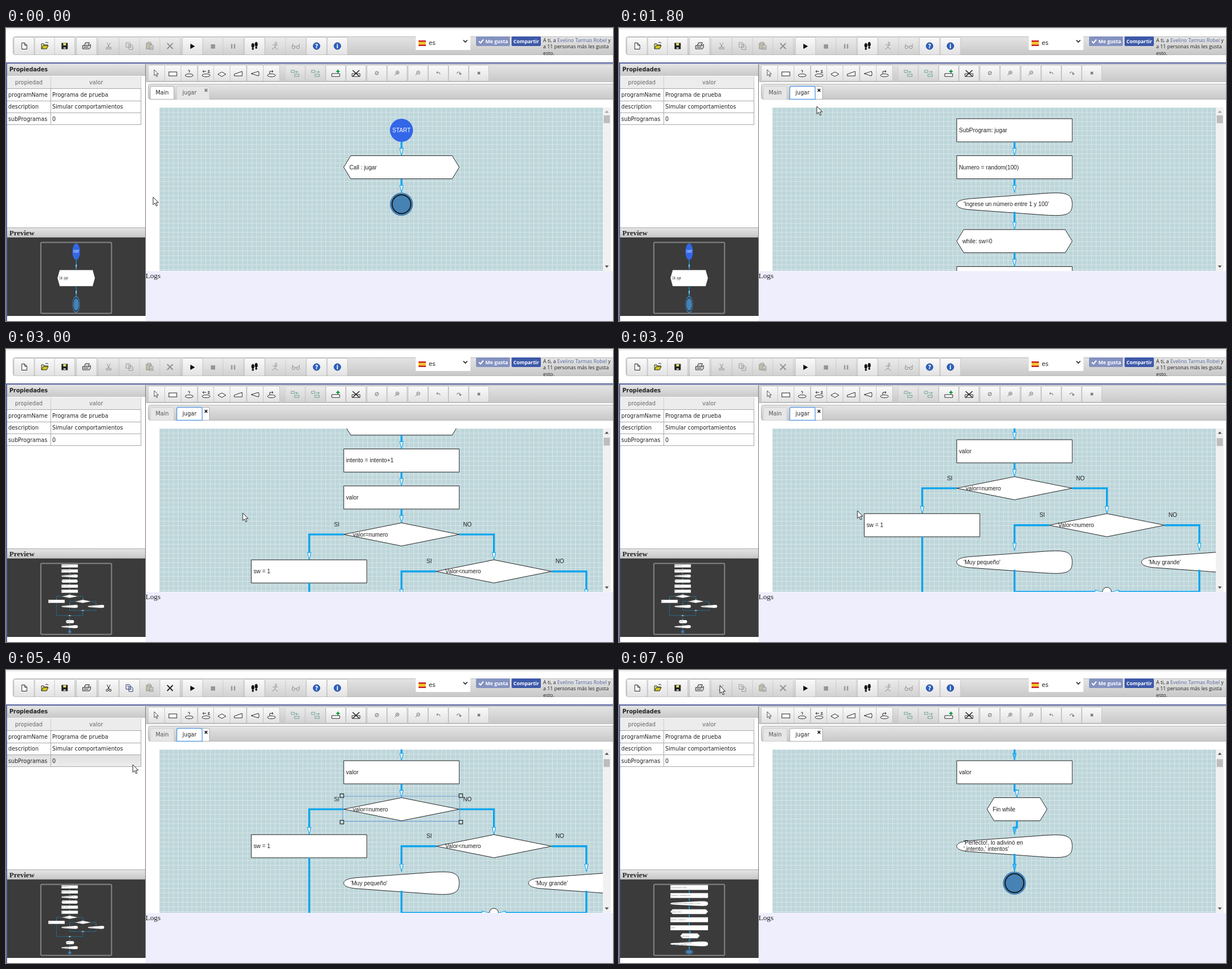
Animation, 1077 px wide and 520 px high, one loop 8 s. Source, as an HTML page:

```html
<!DOCTYPE html>
<html lang="es">
<head>
<meta charset="utf-8">
<title>Editor de diagramas</title>
<style>
html, body { margin: 0; width: 100%; height: 100%; overflow: hidden; background: #fff; }
svg { display: block; width: 1077px; height: 520px; }
text { fill: #222; stroke: none; white-space: pre; }
.ui { font-family: "DejaVu Sans", sans-serif; font-size: 9.7px; }
.small { font-family: "Open Sans", sans-serif; font-size: 8.9px; }
.serif { font-family: "Liberation Serif", serif; font-size: 13.4px; }
.node { font-family: "Liberation Sans", sans-serif; font-size: 10.2px; }
.b { font-weight: bold; }
.shape { fill: #fff; stroke: #222; stroke-width: 1; }
.link { fill: none; stroke: #0aa4ee; stroke-width: 3.4; }
.head { fill: #fff; stroke: #0aa4ee; stroke-width: 1.1; }
#cut .head { fill: #4cbdf2; }
#cut .open .head { fill: #fff; }

.t { animation: 8s step-end infinite; }
.main { animation-name: main; }
.flow { animation-name: flow; }
.cut { animation-name: cut; }
.pmain { animation-name: pmain; }
.pflow { animation-name: pflow; }
.pcut { animation-name: pcut; }
.scroll { animation-name: scroll; }
.thumb { animation-name: thumb; }
.up { animation-name: up; }
.tabHover { animation-name: tabHover; }
.tabOn { animation-name: tabOn; }
.picked { animation-name: picked; }
.cutHover { animation-name: cutHover; }
.tip { animation-name: tip; }
.rowHover { animation-name: rowHover; }
.pointer { animation-name: pointer; }
.arrow { animation-name: arrow; }
.hand { animation-name: hand; }

@keyframes main { 0% { visibility: visible } 17.5%, 100% { visibility: hidden } }
@keyframes flow { 0% { visibility: hidden } 17.5% { visibility: visible } 87.5%, 100% { visibility: hidden } }
@keyframes cut { 0% { visibility: hidden } 87.5%, 100% { visibility: visible } }
@keyframes pmain { 0% { visibility: visible } 25%, 100% { visibility: hidden } }
@keyframes pflow { 0% { visibility: hidden } 25% { visibility: visible } 95%, 100% { visibility: hidden } }
@keyframes pcut { 0% { visibility: hidden } 95%, 100% { visibility: visible } }
@keyframes tabHover { 0% { visibility: hidden } 15% { visibility: visible } 17.5%, 100% { visibility: hidden } }
@keyframes tabOn { 0% { visibility: hidden } 17.5%, 100% { visibility: visible } }
@keyframes picked { 0% { visibility: hidden } 52.5% { visibility: visible } 87.5%, 100% { visibility: hidden } }
@keyframes cutHover { 0% { visibility: hidden } 75% { visibility: visible } 87.5%, 100% { visibility: hidden } }
@keyframes tip { 0% { opacity: 0 } 82.5% { opacity: .4 } 85% { opacity: 1 } 87.5% { opacity: .4 } 90%, 100% { opacity: 0 } }
@keyframes up { 0% { fill: #a3a3a3 } 32.5%, 100% { fill: #505050 } }
@keyframes scroll {
  0% { transform: translateY(0) }
  32.5% { transform: translateY(-82px) }
  35% { transform: translateY(-164px) }
  37.5% { transform: translateY(-246px) }
  40%, 100% { transform: translateY(-328px) }
}
@keyframes thumb {
  0% { transform: translateY(0) }
  32.5% { transform: translateY(.8px) }
  35% { transform: translateY(1.6px) }
  37.5% { transform: translateY(2.4px) }
  40%, 100% { transform: translateY(3.2px) }
}
@keyframes rowHover {
  0% { visibility: hidden; transform: translateY(0) }
  67.5% { visibility: visible; transform: translateY(43px) }
  70% { visibility: visible; transform: translateY(0) }
  72.5%, 100% { visibility: hidden; transform: translateY(0) }
}
@keyframes arrow {
  0% { visibility: visible } 15% { visibility: hidden } 22.5% { visibility: visible }
  75% { visibility: hidden } 87.5%, 100% { visibility: visible }
}
@keyframes hand {
  0% { visibility: hidden } 15% { visibility: visible } 22.5% { visibility: hidden }
  75% { visibility: visible } 87.5%, 100% { visibility: hidden }
}
@keyframes pointer {
  0% { transform: translate(261px, 300px) }
  2.5% { transform: translate(243px, 297px) }
  5% { transform: translate(217px, 275px) }
  7.5% { transform: translate(211px, 238px) }
  10% { transform: translate(243px, 186px) }
  12.5% { transform: translate(303px, 142px) }
  15% { transform: translate(333px, 113px) }
  20% { transform: translate(342px, 121px) }
  22.5% { transform: translate(351px, 139px) }
  25% { transform: translate(362px, 148px) }
  30% { transform: translate(385px, 230px) }
  32.5% { transform: translate(415px, 297px) }
  35% { transform: translate(417px, 295px) }
  37.5% { transform: translate(420px, 291px) }
  40% { transform: translate(423px, 287px) }
  42.5% { transform: translate(425px, 281px) }
  45% { transform: translate(480px, 270px) }
  47.5% { transform: translate(590px, 255px) }
  50% { transform: translate(660px, 245px) }
  55% { transform: translate(808px, 260px) }
  57.5% { transform: translate(795px, 263px) }
  60% { transform: translate(700px, 255px) }
  62.5% { transform: translate(520px, 232px) }
  65% { transform: translate(350px, 200px) }
  67.5% { transform: translate(225px, 168px) }
  70% { transform: translate(214px, 115px) }
  72.5% { transform: translate(202px, 58px) }
  75% { transform: translate(186px, 38px) }
  77.5% { transform: translate(177px, 28px) }
  87.5%, 100% { transform: translate(179px, 28px) }
}
</style>
</head>
<body>
<svg id="stage" viewBox="0 0 1077 520"></svg>
<script>
const rect = (x, y, w, h, fill, more = '') =>
  `<rect x="${x}" y="${y}" width="${w}" height="${h}" fill="${fill}" ${more}/>`;
const text = (x, y, s, cls, more = '') => `<text x="${x}" y="${y}" class="${cls}" ${more}>${s}</text>`;
const path = (d, more = '') => `<path d="${d}" ${more}/>`;
const circle = (x, y, r, more = '') => `<circle cx="${x}" cy="${y}" r="${r}" ${more}/>`;
const timed = (name, body) => `<g class="t ${name}">${body}</g>`;
const at = (x, y, body, more = '') => `<g transform="translate(${x} ${y})" ${more}>${body}</g>`;

// Flowchart parts
const CX = 701.7, W = 205, H = 41, LEFT = 599.2;
const row = k => 161 + 65.6 * k;
const shape = d => path(d, 'class="shape"');
const label = (x, k, s) => text(x, row(k) + 24, s, 'node');
const box = (x, k, s) => shape(`M${x} ${row(k)}h${W}v${H}h${-W}z`) + label(x + 4, k, s);
const hex = (x, k, s, w = W) =>
  shape(`M${x} ${row(k) + 20.5}l12.5 -20.5h${w - 25}l12.5 20.5l-12.5 20.5h${25 - w}z`) + label(x + 10, k, s);
const diamond = (x, k, s) =>
  shape(`M${x} ${row(k) + 20.5}l102.5 -20.5l102.5 20.5l-102.5 20.5z`) + label(x + 16, k, s);
const display = (x, k, lines) => {
  const y = row(k) + 20.5;
  const body = shape(`M${x} ${y}c0 -5 8 -9 27 -10l130 -9.3c34 -2 48 -1 48 19.3s-14 21.3 -48 19.3l-130 -9.3c-19 -1 -27 -5 -27 -10z`);
  return body + (lines.length === 1 ? label(x + 12, k, lines[0])
    : lines.map((s, i) => text(x + 12, y - 3 + 11.5 * i, s, 'node')).join(''));
};
const link = (d, x, y, turn = 0) => path(d, 'class="link"') +
  path('M-3 -13h6l-3 13z', `class="head" transform="translate(${x} ${y}) rotate(${turn})"`);
const down = (x, y1, y2) => link(`M${x} ${y1}V${y2 - 12}`, x, y2);
const next = (k, from = H) => down(CX, row(k) + from, row(k + 1));
const end = k => circle(CX, row(k) + 20.5, 20.5, 'fill="#4682b4"') +
  circle(CX, row(k) + 20.5, 16.6, 'fill="none" stroke="#111" stroke-width="1.7"');
const join = (x, y) => circle(x, y, 8, 'class="shape"');

const mainChart = next(0) + next(1) +
  circle(CX, row(0) + 20.5, 20.5, 'fill="#3367e8"') +
  text(CX, row(0) + 24, 'START', 'node', 'text-anchor="middle" style="fill:#fff"') +
  hex(LEFT, 1, 'Call : jugar') + end(2);

const head = [
  box(LEFT, 0, 'SubProgram: jugar'), box(LEFT, 1, 'Numero = random(100)'),
  display(LEFT, 2, ["'Ingrese un número entre 1 y 100'"]), hex(LEFT, 3, 'while: sw=0'),
  box(LEFT, 4, 'intento = intento+1'), box(LEFT, 5, 'valor')
].join('') + [0, 1, 2, 3, 4].map(k => next(k, k === 2 ? 34 : H)).join('');

const X1 = 538, X2 = 865.7, X3 = 1029.7, J1 = row(9) + 7.6, J2 = row(10) + 7.6;
const mid = k => row(k) + 20.5;
const perfect = ["'Perfecto!, lo adivinó en", "',intento,' intentos'"];
const flowChart = head + next(5) +
  diamond(LEFT, 6, 'valor=numero') + text(582, row(6) + 6, 'SI', 'node') + text(811, row(6) + 6, 'NO', 'node') +
  link(`M${LEFT} ${mid(6)}H${X1}V${row(7) - 12}`, X1, row(7)) +
  link(`M${LEFT + W} ${mid(6)}H${X2}V${row(7) - 12}`, X2, row(7)) +
  box(435.2, 7, 'sw = 1') + diamond(763.2, 7, 'Valor&lt;numero') +
  text(746, row(7) + 6, 'SI', 'node') + text(975, row(7) + 6, 'NO', 'node') +
  link(`M763.2 ${mid(7)}H${CX}V${row(8) - 12}`, CX, row(8)) +
  link(`M968.2 ${mid(7)}H${X3}V${row(8) - 12}`, X3, row(8)) +
  display(LEFT, 8, ["'Muy pequeño'"]) + display(927.2, 8, ["'Muy grande'"]) +
  link(`M${CX} ${row(8) + 34}V${J1}H846`, X2 - 8, J1, -90) +
  link(`M${X3} ${row(8) + 34}V${J1}H886`, X2 + 8, J1, 90) + join(X2, J1) +
  link(`M${X1} ${row(7) + H}V${J2}H682`, CX - 8, J2, -90) +
  link(`M${X2} ${J1 + 8}V${J2}H722`, CX + 8, J2, 90) + join(CX, J2) +
  down(CX, J2 + 8, row(11)) + hex(653, 11, 'Fin while', 106.5) + next(11) +
  display(LEFT, 12, perfect) + next(12, 34) + end(13);

const FX = 706;
const cutChart = head + hex(653, 6, 'Fin while', 106.5) + display(LEFT, 7, perfect) + end(8) +
  `<g class="open">${link(`M${CX} ${row(5) + H}v12H${FX}v3`, FX, row(6))}</g>` +
  link(`M${FX} ${row(6) + H}v12H${CX}v3`, CX, row(7)) + next(7, 34);

const handles = [[596, 223], [807, 223], [596, 270], [807, 270]]
  .map(([x, y]) => rect(x - 3.2, y - 3.2, 6.4, 6.4, '#c4dde2', 'stroke="#222" stroke-width="1.2"')).join('');
const selection = rect(597.5, 224, 207.5, 44.5, 'none', 'stroke="#6a98d8"') + handles;

// Toolbar
const button = (x, y, w, h, more = '') =>
  rect(x - w / 2, y - h / 2, w, h, 'url(#btn)', `stroke="#c6c6c6" rx="2" ${more}`);
const badge = s => circle(0, 0, 6, 'fill="#2d62c4" stroke="#183c86"') +
  text(0, 3.5, s, 'ui b', 'text-anchor="middle" style="fill:#fff"');
const icons = {
  doc: path('M-4 -5.5h5l4 4v7h-9zM1 -5.5v4h4', 'fill="#fff"'),
  open: path('M-6 5v-9h4l1 2h6v2', 'fill="#f4eb95"') + path('M-6 5l3 -6h9l-3 6z', 'fill="#d9c81c"') + path('M1 -6q3 -2 5 1'),
  save: rect(-5, -5, 10, 10, '#222') + rect(-2.5, -5, 5, 4, '#e5df62', 'stroke="none"') + rect(-2, 2, 4, 3, '#aaa', 'stroke="none"'),
  print: path('M-4 -1l2 -5h7l-2 5M-7 -1h12l2 -2v5l-2 3h-12zM-5 2h8', 'fill="#ddd"'),
  cut: path('M-3 -6l4.5 8.5M3 -6l-4.5 8.5') + circle(-2.5, 4, 1.9) + circle(2.8, 4, 1.9),
  copy: path('M-6 -6h6l2 2v6h-8zM-1 -2h5l2 2v6h-7zM-4 -3h4M1 2h3', 'fill="#fff"'),
  paste: rect(-6, -5, 9, 10, '#aa9a55') + rect(-3, -7, 4, 3, '#eee') + rect(0, -1, 6, 7, '#fff') + path('M1 2h4M1 4h4'),
  del: path('M-5 -5l10 10M5 -5l-10 10', 'stroke-width="1.8"'),
  play: path('M-3.5 -3.5l7 4l-7 4z', 'fill="#000"'),
  stop: rect(-3, -2.5, 6.5, 6.5, '#333'),
  pause: path('M-2.5 -3.5v8M2.5 -3.5v8', 'stroke-width="2.2"'),
  steps: '<ellipse cx="-3" cy="-1" rx="2.2" ry="4"/><ellipse cx="3" cy="-3" rx="2.2" ry="4"/><circle cx="-3" cy="5" r="1.4"/><circle cx="3" cy="3" r="1.4"/>',
  run: circle(1, -5.5, 1.5) + path('M-5 -2h9M1 -3l-2 5l5 4M-1 2l-5 4'),
  glasses: circle(-4, 2, 2.6) + circle(4, 2, 2.6) + path('M-1.5 1h3M-6 0l1 -4M6 0l1 -4'),
  help: badge('?'),
  info: badge('i')
};
const tool = (x, name, on) => at(x, 32,
  button(0, 0, 36, 31) + `<g fill="${name === 'steps' ? '#111' : 'none'}" stroke="${name === 'copy' && on ? '#1c2b66' : '#222'}">${icons[name]}</g>`,
  on ? '' : 'opacity=".38"');
const tools = [[32, 'doc', 1], [69, 'open', 1], [104, 'save', 1], [143, 'print', 1], [182, 'cut'], [219, 'copy'],
  [255, 'paste'], [291, 'del'], [331, 'play', 1], [367, 'stop'], [403, 'pause'], [441, 'steps', 1], [478, 'run'],
  [514, 'glasses'], [551, 'help', 1], [588, 'info', 1]].map(a => tool(...a)).join('');
const enabledTools = ['cut', 'copy', 'del'].map((n, i) => tool([182, 219, 291][i], n, 1)).join('');

const ARROW = 'M0 0V13.5l3.1 -2.8l2.3 5.2l2.2 -1l-2.3 -5h4.4z';
const plate = 'M-7 6h14v-5h-14z';
const glass = s => circle(0.5, -1, 2.8) + path('M-1.5 1l-3 3M-.8 -1h2.6' + s);
const parts = [
  [267, 29, path(ARROW, 'fill="#fff" transform="translate(-4 -6) scale(.78)"'), 1],
  [296, 29, rect(-7, -2, 14, 7, '#fff'), 1],
  [325, 29, '<ellipse cy="4" rx="7" ry="2.5" fill="#fff"/>' + path('M-2 -4q2 -3 3 0l-1 3'), 1],
  [355, 29, '<ellipse cy="4" rx="7" ry="2.5" fill="#fff"/>' + path('M-6 -3h6m-4 -2l-2 2l2 2M3 -4q3 -2 3 0l-3 3h4'), 1],
  [383, 29, path('M-7 2l7 -4l7 4l-7 4z', 'fill="#fff"'), 1],
  [412, 29, path('M-7 5v-3l14 -5v8z', 'fill="#fff"'), 1],
  [442, 29, path('M-7 1l13 -4q2 4 0 8z', 'fill="#fff"'), 1],
  [471, 29, '<ellipse cy="4" rx="7" ry="2.5" fill="#fff"/>' + path('M-3 1v-4h6m-2 -2l2 2l-2 2'), 1],
  [513, 35, path('M-7 -5h6v4h-6zM-1 2h8v4h-8zM6 -2h-5m2 -2l-2 2l2 2', 'stroke="#277a68"')],
  [549, 35, path('M-7 -5h6v4h-6zM-1 2h8v4h-8zM1 -2h6m-2 -2l2 2l-2 2', 'stroke="#277a68"')],
  [585, 35, path(plate, 'fill="#fff"') + path('M4 -6v6M1 -3h6', 'stroke="#079a37" stroke-width="2"'), 1],
  [621, 35, path(plate, 'fill="#fff"') + path('M-6 -5l12 11M6 -5l-12 11', 'stroke-width="1.6"'), 1],
  [658, 35, circle(0, 0, 3) + path('M-2 2l4 -4')],
  [694, 35, glass('M.5 -2.2v2.6')],
  [731, 35, glass('')],
  [767, 35, path('M-3 -1h4q2 0 2 3M-1 -3l-2 2l2 2')],
  [803, 35, path('M3 1q0 -3 -3 -3t-3 3M1 1h4l-2 2z')],
  [839, 35, path('M-2 -2l4 4M2 -2l-4 4', 'stroke-width="2"')]
].map(([x, w, icon, on]) => at(x, 80, button(0, 0, w, 28, x === 513 || x === 549 ? 'opacity=".4"' : '') +
  `<g fill="none" stroke="#222" ${on ? '' : 'opacity=".6"'}>${icon}</g>`)).join('');

// Tabs
const tabShape = (x, w, more) => path(`M${x} 126.5v-20q0 -3 3 -3h${w - 6}q3 0 3 3v20z`, more);
const tab = (x, w, s, active, focus) =>
  tabShape(x, w, `fill="${active ? '#fff' : '#e6e6e6'}" stroke="${focus ? '#5c9fe4' : active ? '#aaa' : '#cfcfcf'}" stroke-width="${focus ? 1.4 : 1}"`) +
  text(x + w / 2, 118, s, 'ui', `text-anchor="middle" style="fill:${active ? '#222' : '#555'}"`);
const close = color => path('M352.6 108.2l4.6 4.6m0 -4.6l-4.6 4.6', `stroke="${color}" stroke-width="1.8"`);
const wide = (fill, stroke) => tabShape(303, 58, `fill="${fill}" stroke="${stroke}"`);
const jugar = more => text(325.5, 118, 'jugar', 'ui', `text-anchor="middle" ${more}`);
const tabs = rect(252.5, 99.5, 830, 27, 'url(#bar)', 'stroke="#b4b4b4" rx="4"') +
  tab(256, 42, 'Main', 0) + wide('#e6e6e6', '#cfcfcf') + jugar('style="fill:#555"') + close('#777') +
  timed('main', tab(256, 42, 'Main', 1)) +
  timed('tabHover', wide('#f0f0f0', '#999') + jugar('') + close('#777')) +
  timed('tabOn', wide('#fff', '#aaa') + jugar('') + close('#222')) +
  timed('flow', tab(303, 45, 'jugar', 1, 1));

// Properties
const props = [['programName', 'Programa de prueba'], ['description', 'Simular comportamientos'], ['subProgramas', '0']];
const table = rect(2, 64, 245, 21, 'url(#bar)') + text(6, 77, 'Propiedades', 'ui b') +
  rect(2, 86, 238, 21.5, '#ececec') +
  text(40.5, 100, 'propiedad', 'ui', 'text-anchor="middle" style="fill:#666"') +
  text(160, 100, 'valor', 'ui', 'text-anchor="middle" style="fill:#666"') +
  timed('rowHover', rect(2, 108, 238, 21, 'url(#row)')) +
  path('M2 107.5H239.5M2 129.5H239.5M2 150.5H239.5M2 171.5H239.5M239.5 107V172M79.5 107V172', 'stroke="#a8a8a8" fill="none"') +
  path('M79.5 86V107M239.5 86V107', 'stroke="#ccc"') +
  props.map(([a, b], i) => text(4, 122 + 21.4 * i, a, 'ui') + text(82, 122 + 21.4 * i, b, 'ui')).join('');

const mini = (id, sx, sy, tx, ty) => timed('p' + id, `<use href="#${id}" transform="translate(${tx} ${ty}) scale(${sx} ${sy})"/>`);
const preview = rect(2, 355, 245, 16, 'url(#bar)') + path('M2 354.5H247', 'stroke="#aaa"') +
  text(6, 367.5, 'Preview', 'serif b', 'style="font-size:13px"') +
  rect(2, 371.5, 245.5, 139.5, '#3b3b3b') +
  rect(61.8, 380.5, 125.5, 126, 'none', 'stroke="#858585" stroke-width="2" rx="2"') +
  mini('main', .327, .714, -104.9, 267.4) + mini('flow', .1425, .137, 13, 360.1) + mini('cut', .327, .218, -104.9, 346.4);

const social = rect(727, 15, 97, 24, '#fff') +
  rect(732, 22, 13, 10, '#c8202b') + rect(732, 24.5, 13, 5, '#f7c52b') +
  text(750, 30, 'es', 'ui', 'style="font-size:10.5px"') +
  path('M811.5 21.5l3.5 3.5l3.5 -3.5', 'fill="none" stroke="#222" stroke-width="1.7"') +
  rect(834, 15, 60, 17, '#8492c0', 'rx="2"') +
  path('M839 23.5l3 3l5 -6', 'fill="none" stroke="#fff" stroke-width="2"') +
  text(850.5, 27, 'Me gusta', 'small b', 'style="fill:#fff"') +
  rect(897, 15, 52, 17, '#3d59a8', 'rx="2"') +
  text(923, 27, 'Compartir', 'small b', 'text-anchor="middle" style="fill:#fff"') +
  text(953, 24.5, 'A ti, a <tspan fill="#5468a0">Evelino Tarmas Robel</tspan> y', 'small') +
  text(953, 36, 'a 11 personas más les gusta', 'small') + text(953, 47.5, 'esto.', 'small');

const canvas = rect(272, 141, 787, 290, '#bdd6da') + rect(272, 141, 787, 290, 'url(#grid)') +
  `<g clip-path="url(#view)">
    ${timed('main', `<g id="main">${mainChart}</g>`)}
    ${timed('flow', `<g class="t scroll"><g id="flow">${flowChart}</g></g>`)}
    ${timed('cut', `<g transform="translate(0 -328)"><g id="cut">${cutChart}</g></g>`)}
  </g>` + timed('picked', selection) +
  rect(1059, 141, 14, 290, '#f1f1f1') + path('M1062.5 150.5l3.5 -4l3.5 4z', 'class="t up"') +
  path('M1062.5 421.5l3.5 4l3.5 -4z', 'fill="#505050"') +
  timed('thumb', rect(1061, 155.5, 10, 13, '#bdbdbd', 'stroke="#adadad" stroke-width=".6"'));

const tip = timed('tip', rect(183, 49, 36, 16, '#000', 'opacity=".25" rx="2"') +
  rect(180.5, 46.5, 36, 16, '#f6f6f6', 'stroke="#ddd" rx="2"') +
  text(198.5, 58, 'Cortar', 'ui', 'text-anchor="middle" style="fill:#777"'));

const pointer = timed('pointer',
  path(ARROW, 'class="t arrow" fill="#fff" stroke="#222" stroke-width="1"') +
  path('M3.5 10V2q1.3 -2.4 2.6 0v5q2.2 -1 2.5 .4q2 -.7 2.4 .6q1.8 -.3 1.8 1.4v3.6l-1.6 4h-6l-4.5 -6q-.2 -2 1.6 -1.2z',
    'class="t hand" fill="#fff" stroke="#222" stroke-width="1"'));

const fade = (id, a, b) => `<linearGradient id="${id}" x2="0" y2="1"><stop stop-color="${a}"/><stop offset="1" stop-color="${b}"/></linearGradient>`;
const defs = `<defs>
  ${fade('bar', '#e4e4e4', '#c8c8c8')}${fade('btn', '#fafafa', '#e2e2e2')}${fade('row', '#e0e0e0', '#ededed')}
  <pattern id="grid" x="272" y="141" width="8.2" height="8.2" patternUnits="userSpaceOnUse">
    <path d="M0 .5H8.2M.5 0V8.2" stroke="#dfeaec" stroke-width=".82"/></pattern>
  <clipPath id="view"><rect x="272" y="141" width="787" height="290"/></clipPath></defs>`;

document.getElementById('stage').innerHTML = defs +
  rect(0, 0, 1077, 520, '#fff') + path('M0 1.5H1077', 'stroke="#d6d6d6"') +
  rect(12.5, 15.5, 1070, 32, 'url(#bar)', 'stroke="#b8b8b8" rx="4"') + tools + timed('picked', enabledTools) +
  timed('cutHover', rect(164, 16.5, 36, 31, 'none', 'stroke="#999" rx="2"')) + social +
  rect(0, 61, 1077, 2.4, '#5f69a2') + rect(0, 61, 2, 459, '#5f69a2') +
  table + preview + path('M247.5 64V511', 'stroke="#777"') +
  rect(249, 64.5, 832, 31, 'url(#bar)', 'stroke="#b8b8b8"') + parts + tabs +
  canvas + rect(248, 431.5, 829, 88.5, '#eeeefd') + text(247.5, 444, 'Logs', 'serif') + tip + pointer;
</script>
</body>
</html>
```
